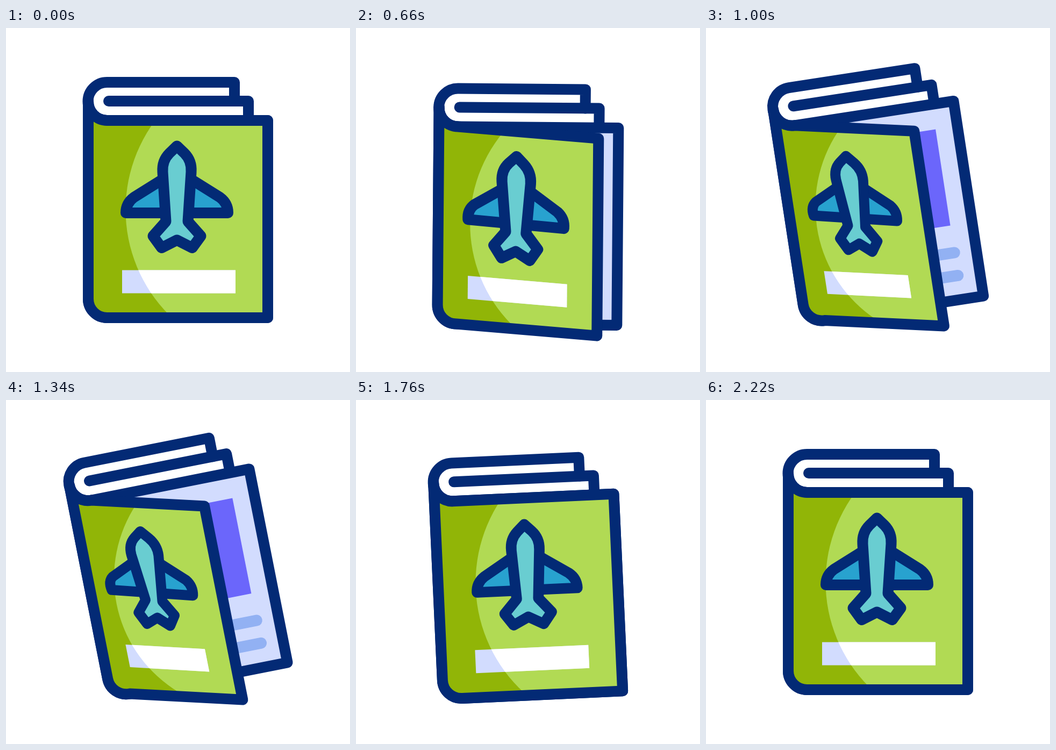
Recreate the animation shown at these times as an HTML page with a canvas. Size 640 by 640 pixels, loop 2400 ms.

```html
<!DOCTYPE html>
<html lang="en">
<head>
<meta charset="utf-8">
<title>Passport</title>
<style>
  html, body { margin: 0; width: 100%; height: 100%; overflow: hidden; background: #fff; }
  canvas { display: block; width: 100vw; height: 100vh; }
</style>
</head>
<body>
<canvas id="stage" width="640" height="640"></canvas>
<script>
const ctx = document.getElementById('stage').getContext('2d');
const LOOP = 2400;
const NAVY = '#032a75', LAVENDER = '#d2dcfe';

const smooth = u => (1 - Math.cos(Math.PI * u)) / 2;
const out = u => Math.sin(Math.PI * u / 2);

// Keys are [time, value, easing towards this key].
const tracks = {
  lift: [[200, 0], [440, 35.8], [1200, -17, out], [1310, -17], [1520, 35], [1930, -4], [2210, 0]],
  tilt: [[235, 0], [555, 4], [1275, -11.4, out], [1310, -11.4], [1620, -2.8], [1780, -2.6], [2210, 0]],
  open: [[440, 0], [1320, 1.2, out], [1660, 0]],
  zoom: [[200, 1], [460, 1.065], [1200, 0.93, out], [1310, 0.93], [1520, 1.055], [1930, 0.943], [2210, 1]]
};

function valueAt(keys, t) {
  const i = keys.findIndex(key => t < key[0]);
  if (i === 0) return keys[0][1];
  if (i < 0) return keys[keys.length - 1][1];
  const [t0, v0] = keys[i - 1], [t1, v1, ease = smooth] = keys[i];
  return v0 + (v1 - v0) * ease((t - t0) / (t1 - t0));
}

function paint(path, fill, width = 20) {
  if (fill) {
    ctx.fillStyle = fill;
    ctx.fill(path);
  }
  ctx.strokeStyle = NAVY;
  ctx.lineWidth = width;
  ctx.stroke(path);
}

// Two numbers make a corner, four make a quadratic curve.
function outline(segments, map) {
  const path = new Path2D();
  segments.forEach(([a, b, c, d], i) => {
    if (c !== undefined) path.quadraticCurveTo(...map(a, b), ...map(c, d));
    else if (i) path.lineTo(...map(a, b));
    else path.moveTo(...map(a, b));
  });
  path.closePath();
  return path;
}

const flip = ([a, b, c, d]) => c === undefined ? [636 - a, b] : [636 - a, b, 636 - c, d];

const wings = [[318, 265], [398, 315], [413, 326, 413, 344], [223, 344], [223, 326, 238, 315]];
const bodySide = [[332, 233], [346, 247, 344.5, 268], [338.5, 360], [362.5, 387], [346.5, 409]];
const body = [
  [318, 219.5], ...bodySide, [318, 394.5],
  flip([346.5, 409]), flip([362.5, 387]), flip([338.5, 360]), flip([344.5, 268]),
  flip([346, 247, 332, 233])
];

const topPages = new Path2D('M425 136V101H188A35 35 0 0 0 188 172H451V136Z');
const topEdge = new Path2D('M425 136V101H188A35 35 0 0 0 188 172');
const middleEdge = new Path2D('M191 136H451V172');
const backPage = new Path2D('M188 172H487V539H188A35 35 0 0 1 153 504V136A35 35 0 0 0 188 172Z');

function drawPages() {
  ctx.fillStyle = '#fff';
  ctx.fill(topPages);
  paint(topEdge);
  paint(middleEdge);
  paint(backPage, LAVENDER);
  ctx.fillStyle = '#6b66fb';
  ctx.fillRect(274, 219, 172, 181);
  ctx.strokeStyle = '#92b1f3';
  ctx.lineWidth = 21;
  ctx.stroke(new Path2D('M285 451H446M285 494H446'));
}

function drawCover(open) {
  const right = 487 - 80 * open, drop = 43.5 * open;
  const cover = new Path2D(`M153 136A35 35 0 0 0 188 172L${right} ${172 + drop}V${539 + drop}L188 539A35 35 0 0 1 153 504Z`);
  const light = new Path2D();
  light.arc(500 - 47 * open, 338 + 27 * open, 277.5 - 25 * open, 0, 2 * Math.PI);
  const label = outline([[216, 450.5], [427, 450.5], [427, 493.5], [216, 493.5]], (x, y) => [
    188 + (1 - 0.271 * open) * (x - 188) - 7.5 * open,
    y + 0.147 * open * (x - 188) - 6.5 * open
  ]);

  ctx.save();
  ctx.clip(cover);
  ctx.fillStyle = '#91b507';
  ctx.fill(cover);
  ctx.fillStyle = '#b1da54';
  ctx.fill(light);
  ctx.fillStyle = LAVENDER;
  ctx.fill(label);
  ctx.clip(light);
  ctx.fillStyle = '#fff';
  ctx.fill(label);
  ctx.restore();
  paint(cover);
}

function drawPlane(open, zoom) {
  // The turning cover narrows the plane towards its tail.
  const map = (x, y) => {
    const taper = Math.min(1, Math.max(0, (y - 265) / 100));
    return [
      318 - 44 * open + (x - 318) * zoom * (1 - 0.19 * open * taper),
      314 + 17.5 * open + (y - 314) * zoom + 0.175 * open * (x - 318)
    ];
  };
  paint(outline(wings, map), '#28a2cf', 20 * zoom);
  paint(outline(body, map), '#69cdd1', 20 * zoom);
}

function draw(now) {
  const t = now % LOOP;
  const [lift, tilt, open, zoom] = ['lift', 'tilt', 'open', 'zoom'].map(name => valueAt(tracks[name], t));
  ctx.fillStyle = '#fff';
  ctx.fillRect(0, 0, 640, 640);
  ctx.save();
  ctx.lineJoin = ctx.lineCap = 'round';
  ctx.translate(320, 334 + lift);
  ctx.rotate(tilt * Math.PI / 180);
  ctx.translate(-320, -334);
  drawPages();
  drawCover(open);
  drawPlane(open, zoom);
  ctx.restore();
}

const start = performance.now();
function tick() {
  draw(performance.now() - start);
  requestAnimationFrame(tick);
}
tick();
</script>
</body>
</html>
```
